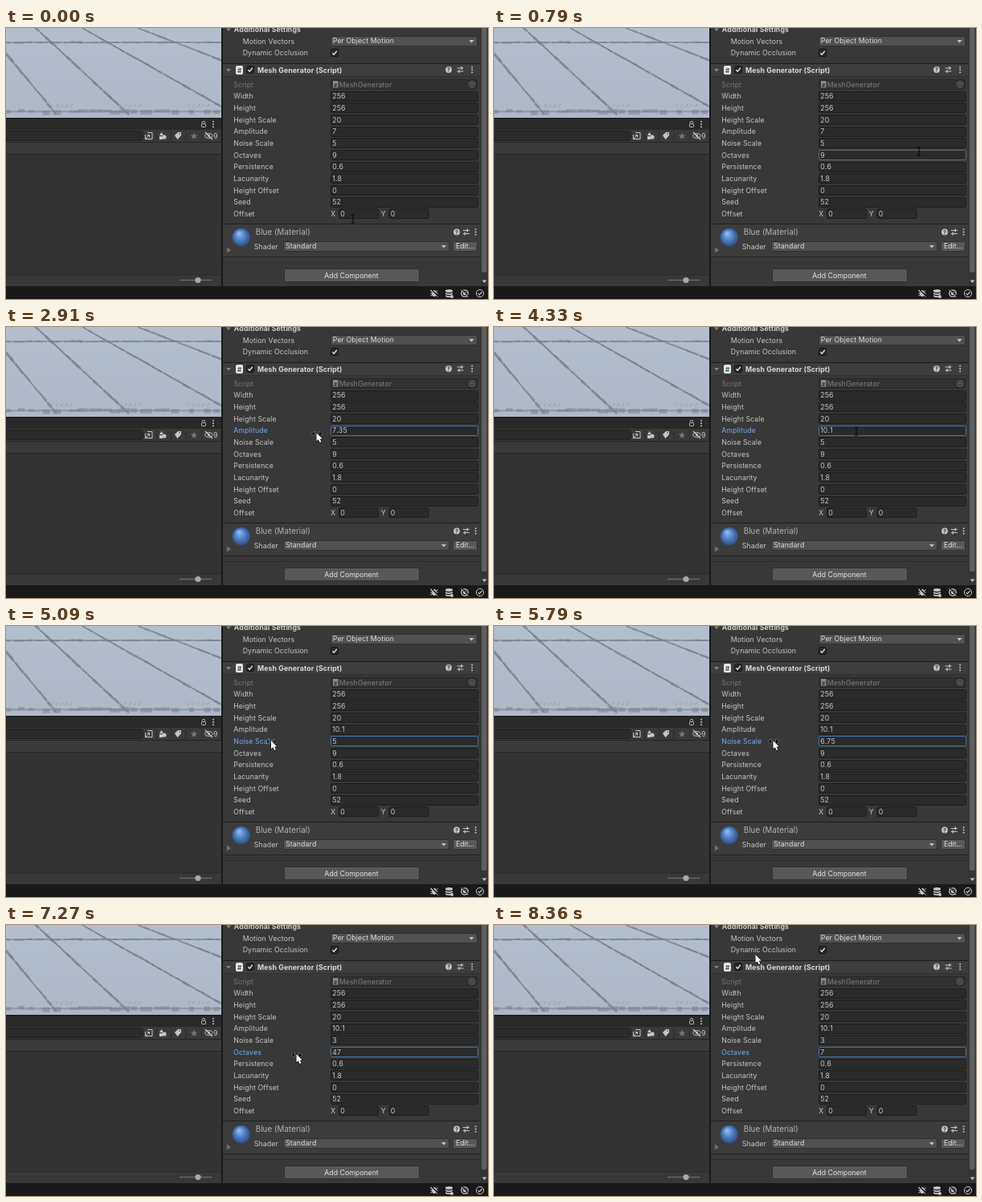
An HTML page with a canvas for the animation above (8.39 s loop, 600 by 338 pixels).

```html
<!DOCTYPE html>
<html lang="en">
<head>
<meta charset="utf-8">
<title>Mesh generator inspector</title>
<style>
html, body { margin: 0; width: 100%; height: 100%; overflow: hidden; background: #383838; }
canvas { display: block; width: 600px; height: 338px; }
</style>
</head>
<body>
<canvas id="stage" width="600" height="338"></canvas>
<script>
const c = document.getElementById('stage').getContext('2d');
const LOOP = 8390, ROW = 14.68, FIRST = 85;
const INK = '#c6c6c6';
const rowY = i => FIRST + ROW * i;

function rect(x, y, w, h, fill) {
  c.fillStyle = fill;
  c.fillRect(x, y, w, h);
}
function box(x, y, w, h, fill, edge, r = 2) {
  c.beginPath();
  c.roundRect(x + .5, y + .5, w - 1, h - 1, r);
  c.fillStyle = fill;
  c.fill();
  c.strokeStyle = edge;
  c.lineWidth = 1;
  c.stroke();
}
function line(points, color, width = 1) {
  c.beginPath();
  points.forEach(([x, y]) => c.lineTo(x, y));
  c.strokeStyle = color;
  c.lineWidth = width;
  c.stroke();
}
function poly(points, fill) {
  c.beginPath();
  points.forEach(([x, y]) => c.lineTo(x, y));
  c.fillStyle = fill;
  c.fill();
}
function disc(x, y, r, fill, ry = r) {
  c.beginPath();
  c.ellipse(x, y, r, ry, 0, 0, 7);
  c.fillStyle = fill;
  c.fill();
}
function ring(x, y, r, color, width = 1) {
  c.beginPath();
  c.arc(x, y, r, 0, 7);
  c.strokeStyle = color;
  c.lineWidth = width;
  c.stroke();
}
function text(s, x, y, color = INK, size = 8.75, weight = 400, align = 'left') {
  c.font = `${weight} ${size}px Inter, "Liberation Sans", sans-serif`;
  c.fontKerning = 'none';
  c.letterSpacing = align === 'left' ? '.1px' : '0px';
  c.textAlign = align;
  c.textBaseline = 'alphabetic';
  c.fillStyle = color;
  c.fillText(s, x - (align === 'left' ? .3 : 0), y + 3.2);
}
function down(x, y, color, r = 3) {
  poly([[x - r, y - r / 2], [x + r, y - r / 2], [x, y + r / 2 + .5]], color);
}
function check(x, y) {
  box(x, y, 10, 10, '#2a2a2a', '#151515');
  line([[x + 2.3, y + 5.2], [x + 4.2, y + 7.2], [x + 7.8, y + 2.7]], '#e0e0e0', 1.4);
}
function dots(x, y) {
  for (const d of [-3.2, 0, 3.2]) disc(x, y + d, 1, INK);
}
function headIcons(x, y, gap) {
  disc(x, y, 3.9, INK);
  text('?', x, y, '#333', 7, 700, 'center');
  const s = x + gap;
  line([[s - 4, y - 2], [s + 4, y - 2]], INK);
  line([[s - 4, y + 2], [s + 4, y + 2]], INK);
  line([[s + 1.5, y - 4], [s + 1.5, y]], INK, 1.3);
  line([[s - 1.5, y], [s - 1.5, y + 4]], INK, 1.3);
  dots(x + gap * 2, y);
}
function field(x, y, w, value, edge = '#1d1d1d') {
  box(x, Math.round(y - 6.5), w, 13, '#2a2a2a', edge);
  text(value, x + 2.5, y);
}

function random(seed) {
  return () => (seed = seed * 16807 % 2147483647) / 2147483647;
}
// Grid line with short, unevenly worn strokes over it.
function worn(x1, y1, x2, y2, width, rnd) {
  line([[x1, y1], [x2, y2]], '#838d99cc', width * .8);
  const n = Math.hypot(x2 - x1, y2 - y1) / 9;
  for (let i = 0; i < n; i++) {
    const a = i / n, b = Math.min(1, a + (.6 + rnd()) / n);
    const at = k => [x1 + (x2 - x1) * k, y1 + (y2 - y1) * k + rnd() - .5];
    line([at(a), at(b)], '#717a8588', width * (.5 + rnd()));
  }
}
function scene() {
  const rnd = random(41);
  c.save();
  c.beginPath();
  c.rect(0, 0, 268, 112);
  c.clip();
  const g = c.createLinearGradient(0, 0, 0, 112);
  g.addColorStop(0, '#b3bfcd');
  g.addColorStop(1, '#aeb8c6');
  rect(0, 0, 268, 112, g);
  worn(0, 18, 268, 18, 1.8, rnd);
  worn(0, 32, 63, 108, 2.4, rnd);
  worn(36, -1, 153, 108, 2.3, rnd);
  worn(95, 0, 268, 98, 2.1, rnd);
  worn(164, 0, 268, 40, 1.9, rnd);
  rect(0, 103, 268, 2.5, '#838d9999');
  for (let x = -6; x < 268; x += 10 + rnd() * 12)
    rect(x, 101 + rnd() * 2, 6 + rnd() * 12, 3 + rnd() * 3, '#79828c88');
  for (const x of [56, 141, 226])
    for (let i = 0; i < 5; i++) line([[x + i * 6, 99], [x + i * 6 + 3, 95]], '#9aa4b0', 1.2);
  c.restore();
}

function project() {
  rect(0, 112, 268, 1, '#171717');
  rect(0, 113, 268, 14, '#292929');
  rect(0, 127, 268, 15, '#3a3a3a');
  box(-4, 128, 175, 13, '#2a2a2a', '#202020');
  rect(0, 142, 268, 1, '#232323');
  rect(0, 143, 268, 14, '#3a3a3a');
  rect(0, 157, 268, 1, '#252525');
  rect(0, 158, 268, 150, '#333');
  rect(0, 308, 268, 14, '#383838');
  rect(0, 307.5, 268, 1, '#2b2b2b');
  line([[216, 314.5], [256, 314.5]], '#686868', 1.3);
  disc(239, 314.5, 3.6, '#a9a9a9');

  box(243, 119, 6, 5, '#292929', INK, 1);
  c.beginPath();
  c.arc(246, 118.5, 2, Math.PI, 0);
  c.stroke();
  dots(258, 120);

  for (const x of [187, 205, 224, 243, 267]) rect(x, 128, 1, 13, '#2c2c2c');
  line([[176, 130.5], [182, 130.5], [182, 138.5], [173.5, 138.5], [173.5, 133]], INK);
  line([[173.5, 138.5], [178.5, 133.5]], INK);
  line([[175.5, 133.5], [178.5, 133.5], [178.5, 136.5]], INK);
  poly([[191, 134], [193.5, 130], [196, 134]], INK);
  disc(197, 136, 2.6, INK);
  rect(191, 135, 4, 4, INK);
  poly([[210, 134], [214, 130], [218, 130], [218, 134], [213.5, 139]], INK);
  disc(216, 132, .8, '#3a3a3a');
  const star = [...Array(10)].map((_, i) => {
    const a = i * Math.PI / 5 - Math.PI / 2, r = i % 2 ? 2 : 4.7;
    return [234 + r * Math.cos(a), 135 + r * Math.sin(a)];
  });
  poly(star, '#747474');
  c.beginPath();
  c.ellipse(252.5, 134.5, 4.6, 2.8, 0, 0, 7);
  c.strokeStyle = INK;
  c.stroke();
  disc(252.5, 134.5, 1.4, INK);
  line([[248, 130], [257, 139]], INK, 1.2);
  text('9', 258.5, 135, INK, 8.5);
}

function statusBar() {
  const bar = '#191919';
  rect(0, 322, 600, 16, bar);
  for (const s of [-1, 1])
    for (const d of [-3.3, 0, 3.3]) line([[533, 331], [533 + s * 4.6, 331 + d]], INK);
  disc(533, 331, 2.7, INK, 4);
  line([[529, 326], [538, 335]], bar, 2);
  line([[528.5, 326.5], [537.5, 335.5]], INK);
  for (const y of [334, 331, 328]) {
    disc(551.5, y + .8, 4.8, bar, 2.4);
    disc(551.5, y, 4.6, INK, 1.9);
  }
  disc(555, 335, 2, INK);
  ring(571, 331, 4.2, INK, 1.3);
  disc(571, 331, 2.2, INK);
  line([[567.5, 326.5], [576, 335]], bar, 1.5);
  line([[566.5, 326.5], [575.5, 335.5]], INK);
  ring(590, 331, 4.6, INK, 1);
  line([[587.7, 331], [589.4, 332.8], [592.5, 329]], INK, 1.2);
}

function inspector() {
  rect(268, 0, 2, 322, '#191919');
  rect(270, 0, 330, 322, '#383838');
  rect(590, 0, 10, 322, '#353535');
  c.beginPath();
  c.roundRect(592, -5, 6.5, 310, 2.5);
  c.fillStyle = '#5f5f5f';
  c.fill();
  down(595.5, 316, INK, 2.8);

  down(277, 2, '#858585');
  text('Additional Settings', 284, 2.2, '#d0d0d0', 8.75, 700);
  text('Motion Vectors', 295, 16.5);
  box(404, 10, 183, 13, '#515151', '#303030');
  text('Per Object Motion', 407, 16.2, '#dedede');
  down(579.5, 16.5, INK);
  text('Dynamic Occlusion', 295, 31.2);
  check(404, 26);

  rect(270, 44, 320, 1, '#1c1c1c');
  rect(270, 45, 320, 15, '#3e3e3e');
  rect(270, 60, 320, 1, '#303030');
  down(277, 52.5, '#858585');
  box(286, 47, 9, 11, '#e4e4e4', '#e4e4e4', 1);
  text('#', 290.5, 52.5, '#35603a', 8, 700, 'center');
  check(299, 47);
  text('Mesh Generator (Script)', 313.3, 52.5, '#dadada', 8.75, 700);
  headIcons(551, 52, 14.6);

  text('Script', 283.5, 70.3, '#777');
  box(404, 64, 183, 13, '#313131', '#282828');
  rect(407, 66, 6.5, 8.5, '#888');
  text('#', 410.2, 70.5, '#333', 6.5, 700, 'center');
  text('MeshGenerator', 415, 70.3, '#808080');
  ring(580, 70.3, 3.6, '#737373');
  disc(580, 70.3, 1.3, '#737373');

  rect(270, 244, 320, 1, '#1f1f1f');
  rect(270, 245, 320, 40, '#3c3c3c');
  const ball = c.createRadialGradient(290, 256, 1, 292.8, 261, 12);
  ball.addColorStop(0, '#8db8f0');
  ball.addColorStop(.45, '#5583c8');
  ball.addColorStop(1, '#2b4a7c');
  disc(292.8, 261, 11.2, ball);
  text('Blue (Material)', 311, 255.2, '#b4b4b4', 9.7);
  headIcons(561, 254.5, 11.8);
  text('Shader', 309, 272.3);
  box(345, 266, 207, 13, '#515151', '#303030');
  text('Standard', 348.4, 272, '#dedede');
  down(545, 272.5, INK);
  box(556, 266, 31, 13, '#585858', '#303030');
  text('Edit...', 571.5, 272, '#e2e2e2', 8.75, 400, 'center');
  poly([[275, 273.5], [280, 277], [275, 280.5]], '#707070');
  rect(270, 285, 320, 1, '#232323');
  rect(270, 292, 320, 1, '#2c2c2c');
  box(346, 300, 169, 17, '#585858', '#303030');
  text('Add Component', 430, 308.3, '#e4e4e4', 8.75, 400, 'center');
}

// Pointer path: time, x, y
const path = [
  [0, 432, 238], [300, 500, 120], [480, 470, 48], [790, 529, 154],
  [1150, 480, 62], [1500, 430, 215], [1900, 420, 150], [2300, 378, 131],
  [2450, 378, 131], [2700, 360, 131], [2910, 386, 131], [3400, 430, 131],
  [3800, 405, 131], [4240, 451, 130], [4330, 451, 130], [4900, 329.5, 142],
  [5180, 329.5, 142], [5500, 432, 142], [5790, 347, 142], [6000, 309.5, 142],
  [6150, 309.5, 142], [6500, 323, 160], [6850, 323, 160], [7050, 440, 160],
  [7270, 361, 160], [7670, 321, 160], [7900, 321, 160], [8360, 325, 36]
];
function pointer(t) {
  const i = path.findIndex(p => p[0] > t);
  if (i < 0) return path.at(-1).slice(1);
  const [t0, x0, y0] = path[i - 1], [t1, x1, y1] = path[i];
  let k = (t - t0) / (t1 - t0);
  k *= k * (3 - 2 * k);
  return [x0 + (x1 - x0) * k, y0 + (y1 - y0) * k];
}

// Label drags: row, start, end, focus time, initial value, change per pixel, step
const drags = [
  { row: 3, from: 2450, to: 4240, focus: 2420, base: 7, rate: .0423, step: .05 },
  { row: 4, from: 5180, to: 6050, focus: 4960, base: 5, rate: .1, step: .05 },
  { row: 5, from: 6850, to: 7750, focus: 6550, base: 9, rate: 1, step: 1 }
];
const isDragging = t => drags.some(d => t >= d.from && t < d.to);
function dragValue(d, t) {
  const shift = pointer(Math.min(Math.max(t, d.from), d.to))[0] - pointer(d.from)[0];
  return String(+(Math.round((d.base + shift * d.rate) / d.step) * d.step).toFixed(2));
}

const rows = [['Width', 256], ['Height', 256], ['Height Scale', 20], ['Amplitude', 7],
  ['Noise Scale', 5], ['Octaves', 9], ['Persistence', .6], ['Lacunarity', 1.8],
  ['Height Offset', 0], ['Seed', 52]];

function fields(t, x, y) {
  const focus = drags.findLast(d => t >= d.focus)?.row;
  const edge = (left, w, cy) =>
    !isDragging(t) && x >= left && x < left + w && Math.abs(y - cy) < 6 ? '#696969' : '#1d1d1d';
  rows.forEach(([label, value], i) => {
    const cy = rowY(i), d = drags.find(d => d.row === i), on = focus === i;
    text(label, 283.5, cy, on ? '#78a9f0' : INK);
    field(404, cy, 184, d ? dragValue(d, t) : String(value), on ? '#3f74b0' : edge(404, 184, cy));
  });
  const cy = rowY(10);
  text('Offset', 283.5, cy);
  text('X', 404.5, cy);
  field(414, cy, 50, '0', edge(414, 50, cy));
  text('Y', 467, cy);
  field(476.5, cy, 50, '0', edge(476.5, 50, cy));
}

function cursor(t, x, y) {
  const inRows = y > 78 && y < 240;
  if (inRows && x > 404 && !isDragging(t)) {
    line([[x, y - 5], [x, y + 5]], '#090909', 1.2);
    for (const s of [-5, 5]) line([[x - 2.5, y + s], [x + 2.5, y + s]], '#090909');
    return;
  }
  if (isDragging(t) || inRows && x > 283) {
    for (const s of [-1, 1]) {
      const tip = [[6.5, 2], [3, -1], [3, 5]].map(([dx, dy]) => [x + 1 + s * dx, y + dy]);
      line([...tip, tip[0]], '#d8d8d8aa', 1);
      poly(tip, '#080808');
    }
  }
  const arrow = [[0, 0], [0, 11.5], [2.6, 9.2], [4.5, 13.4], [6.6, 12.5], [4.8, 8.4], [8.2, 8.2]]
    .map(([dx, dy]) => [x + .5 + dx * .9, y + 1 + dy * .9]);
  line([...arrow, arrow[0]], '#111', 1.4);
  poly(arrow, '#fff');
}

function draw(now) {
  const t = now % LOOP;
  const [x, y] = pointer(t);
  scene();
  project();
  inspector();
  statusBar();
  fields(t, x, y);
  cursor(t, x, y);
}
const start = performance.now();
function tick() {
  draw(performance.now() - start);
  requestAnimationFrame(tick);
}
tick();
</script>
</body>
</html>
```
